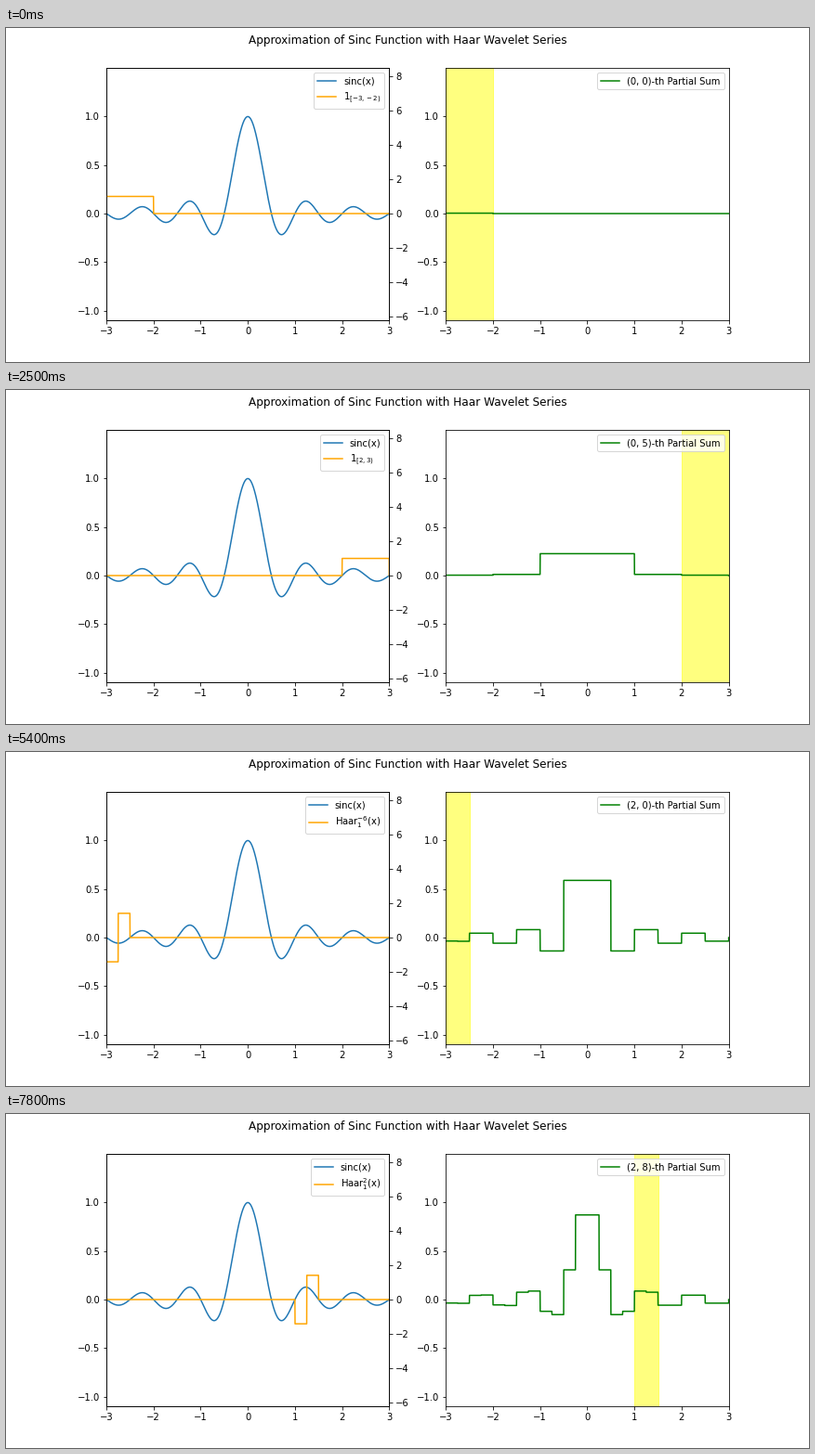
A matplotlib script for the animation above (8 s loop, 864 px wide and 360 px high).

```python
import numpy as np
import matplotlib.pyplot as plt
from matplotlib.animation import FuncAnimation

plt.rcParams.update({"font.family": "DejaVu Sans", "font.size": 10})

INTERVAL = 100
LOOP = 8000
HOLDS = (500, 400, 300)      # time per term at each level
LEFT, RIGHT = -3, 3
TERMS = (6, 6, 12)

x = np.linspace(LEFT, RIGHT, 6001)


def cell_means(cells_per_unit, samples=2000):
    """Mean of sinc(2x) over each dyadic cell, by the midpoint rule."""
    count = (RIGHT - LEFT) * cells_per_unit
    t = LEFT + (np.arange(count * samples) + 0.5) / (cells_per_unit * samples)
    return np.sinc(2 * t).reshape(count, samples).mean(axis=1)


def staircase(cells_per_unit):
    means = np.append(cell_means(cells_per_unit), 0)
    return means[np.floor((x - LEFT) * cells_per_unit + 1e-9).astype(int)]


STAIRS = [np.zeros_like(x)] + [staircase(n) for n in (1, 2, 4)]


def term_at(ms):
    for level, (hold, count) in enumerate(zip(HOLDS, TERMS)):
        if ms < hold * count:
            return level, ms // hold
        ms -= hold * count


def between(a, b):
    return (x >= a - 1e-9) & (x < b - 1e-9)


def basis(level, index):
    """Return the support, the basis function and its label."""
    if level == 0:
        a = LEFT + index
        return a, a + 1, between(a, a + 1) * 1.0, f"$1_{{[{a},{a + 1})}}$"
    scale = level - 1
    width = 0.5 ** scale
    k = LEFT * 2 ** scale + index
    a, b = k * width, (k + 1) * width
    mid = (a + b) / 2
    wave = 2 ** (scale / 2) * (between(mid, b) * 1.0 - between(a, mid))
    return a, b, wave, f"Haar$_{scale}^{{{k}}}$(x)"


fig, (ax, ax_sum) = plt.subplots(1, 2, figsize=(12, 5), dpi=72)
fig.subplots_adjust(left=0.125, right=0.9, bottom=0.125, top=0.88, wspace=0.2)
fig.suptitle("Approximation of Sinc Function with Haar Wavelet Series")
ax_wave = ax.twinx()


def draw(frame):
    level, index = term_at(frame * INTERVAL)
    a, b, wave, label = basis(level, index)
    for axes in (ax, ax_wave, ax_sum):
        axes.clear()
        axes.set_xlim(LEFT, RIGHT)
        axes.set_ylim(-1.1, 1.5)
        axes.set_yticks(np.arange(-1, 1.1, 0.5))
    ax_wave.set_ylim(-1.1 * 32 ** 0.5, 1.5 * 32 ** 0.5)
    ax_wave.set_yticks(range(-6, 9, 2))
    ax_wave.yaxis.tick_right()

    sinc_line, = ax.plot(x, np.sinc(2 * x), label="sinc(x)")
    wave_line, = ax_wave.plot(x, wave, color="orange", label=label)
    ax_wave.legend(handles=[sinc_line, wave_line], loc="upper right")

    partial = np.where(x < b - 1e-9, STAIRS[level + 1], STAIRS[level])
    ax_sum.axvspan(a, b, color="yellow", alpha=0.5)
    ax_sum.plot(x, partial, color="green",
                label=f"({level}, {index})-th Partial Sum")
    ax_sum.legend(loc="upper right")
    return []


animation = FuncAnimation(fig, draw, frames=LOOP // INTERVAL,
                          interval=INTERVAL, init_func=lambda: [],
                          repeat=True, repeat_delay=0)
plt.show()
```
